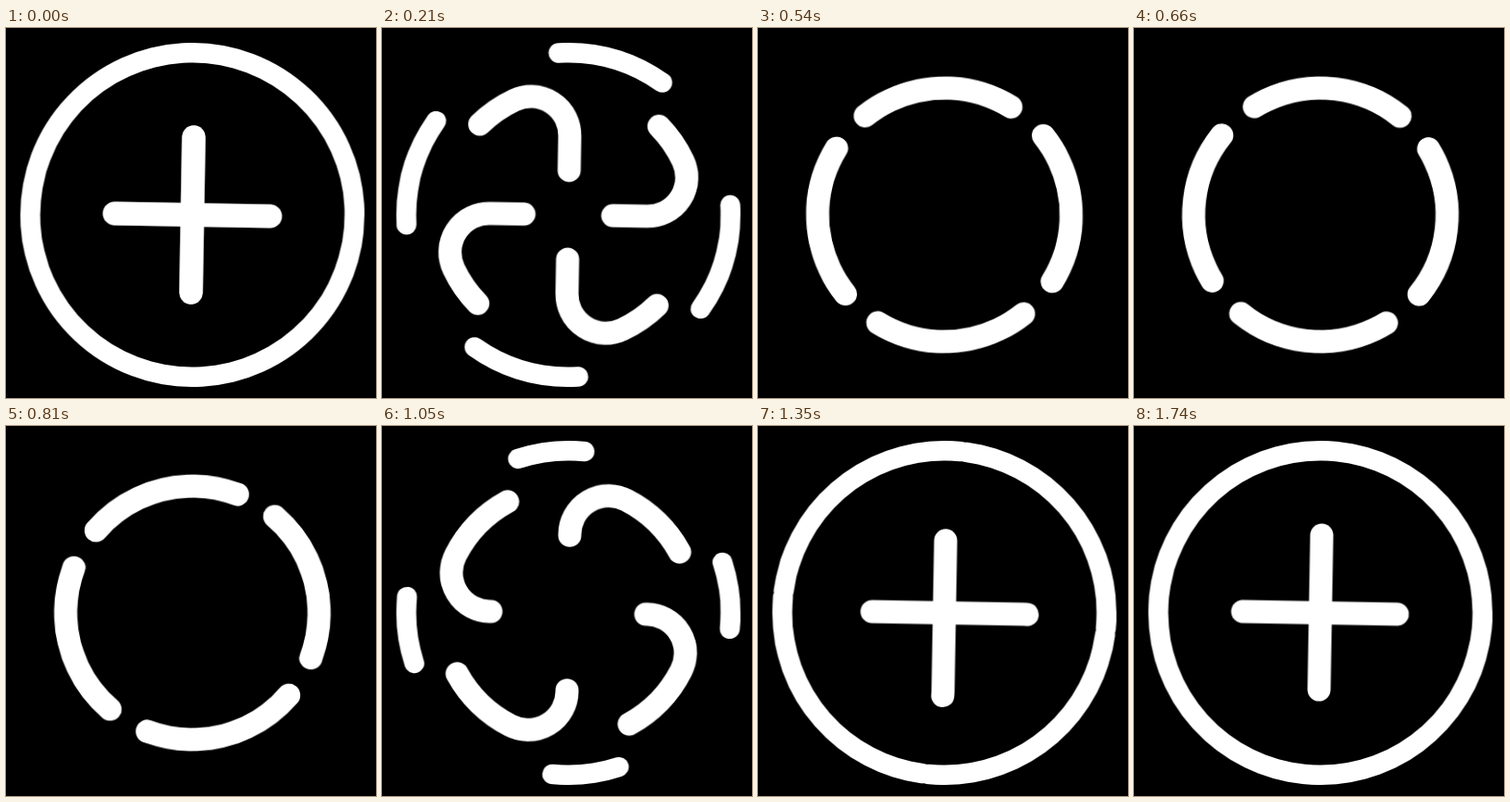
Animation, 400 px wide and 400 px high, one loop 3860 ms. Source, as an HTML page without scripts:

```html
<!DOCTYPE html>
<html lang="en">
<head>
<meta charset="utf-8">
<title>Plus spinner</title>
<style>
  html, body { margin: 0; height: 100%; overflow: hidden; background: #000; }
  svg { display: block; width: 100%; height: 100%; }
  svg * { fill: none; stroke: #fff; stroke-linecap: round; }

  .ring {
    stroke-width: 21.5;
    animation: ring 3860ms infinite;
  }
  .strand {
    stroke-width: 25;
    stroke-dasharray: 168 2000;
    animation: run 3860ms infinite;
  }
  /* these two merge into the opposite bars once the plus has formed */
  .merge { animation: run 3860ms infinite, merge 3860ms step-end infinite; }

  /* distance travelled along the track */
  @keyframes run {
    0% { stroke-dashoffset: 0; animation-timing-function: cubic-bezier(.333, .08, .667, .48); }
    5.44% { stroke-dashoffset: -131; animation-timing-function: cubic-bezier(.333, .256, .667, .595); }
    13.99% { stroke-dashoffset: -547; animation-timing-function: cubic-bezier(.333, .302, .667, .672); }
    20.985% { stroke-dashoffset: -1003; animation-timing-function: cubic-bezier(.333, .398, .667, .756); }
    27.2% { stroke-dashoffset: -1337; animation-timing-function: cubic-bezier(.333, .626, .667, .972); }
    34.974% { stroke-dashoffset: -1500; animation-timing-function: cubic-bezier(.333, .87, .667, 1); }
    45.08%, 100% { stroke-dashoffset: -1506.7; }
  }

  @keyframes merge {
    0% { opacity: 1; }
    34.2%, 100% { opacity: 0; }
  }

  /* four arcs shrink towards one end, then grow back from the other */
  @keyframes ring {
    0% { stroke-dasharray: 90 0; stroke-dashoffset: 3.5; animation-timing-function: cubic-bezier(.333, .08, .667, .48); }
    5.44% { stroke-dasharray: 39.3 50.7; stroke-dashoffset: 3.5; animation-timing-function: linear; }
    7.85% { stroke-dasharray: 0 90; stroke-dashoffset: 3.5; opacity: 1; animation-timing-function: step-start; }
    7.86% { stroke-dasharray: 0 90; stroke-dashoffset: 3.5; opacity: 0; animation-timing-function: step-end; }
    25.79% { stroke-dasharray: 0 90; stroke-dashoffset: -5.7; opacity: 0; animation-timing-function: step-start; }
    25.8% { stroke-dasharray: 0 90; stroke-dashoffset: -5.7; opacity: 1; animation-timing-function: linear; }
    27.2% { stroke-dasharray: 23.4 66.6; stroke-dashoffset: 17.7; animation-timing-function: cubic-bezier(.333, .626, .667, .972); }
    34.974% { stroke-dasharray: 88 2; stroke-dashoffset: 82.3; }
    45.08%, 100% { stroke-dasharray: 90 0; stroke-dashoffset: 84.3; }
  }
</style>
</head>
<body>
<svg viewBox="0 0 400 400">
  <defs>
    <!-- out from the centre, round the circle, back in from the far side -->
    <path id="track" d="M0 84V-85.2
      A42 42 0 0 0 -60.6 -122.9
      A137 137 0 0 0 60.6 122.9
      A137 137 0 0 0 -60.6 -122.9
      A137 137 0 0 0 -60.6 122.9
      A42 42 0 0 0 0 85.2V-84"/>
  </defs>
  <g transform="translate(201.5 202)">
    <circle class="ring" r="175.3" pathLength="360" transform="rotate(-90)"/>
    <g transform="rotate(1)">
      <use class="strand" href="#track"/>
      <use class="strand merge" href="#track" transform="rotate(90)"/>
      <use class="strand merge" href="#track" transform="rotate(180)"/>
      <use class="strand" href="#track" transform="rotate(270)"/>
    </g>
  </g>
</svg>
</body>
</html>
```
